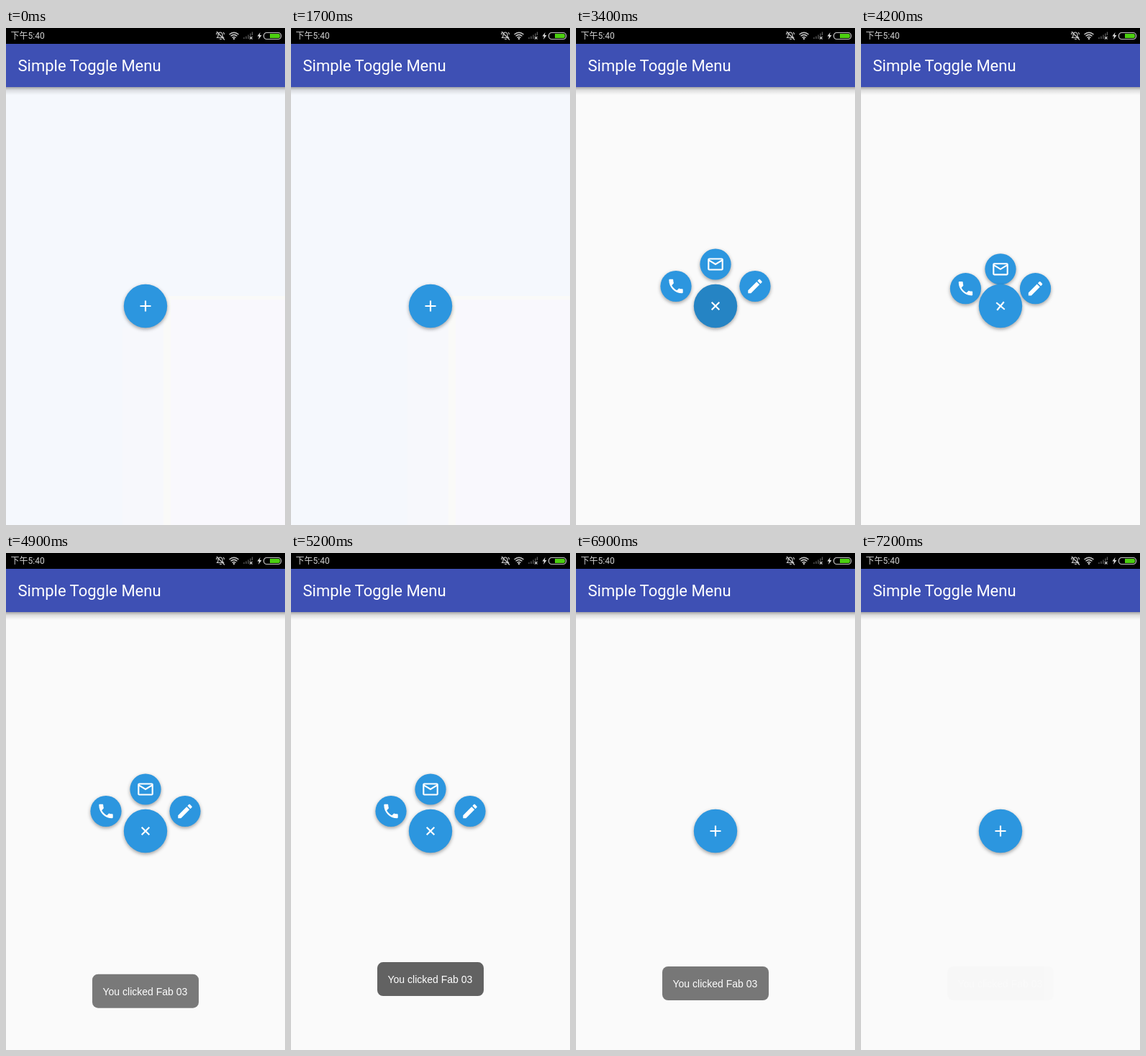
Animation, 388 px wide and 690 px high, one loop 7300 ms. Source, as an HTML page:

```html
<!DOCTYPE html>
<html lang="en">
<head>
<meta charset="utf-8">
<title>Toggle menu</title>
<style>
  html, body { margin: 0; width: 100%; height: 100%; overflow: hidden; background: #fafafa; }
  svg { display: block; }
  .fab { filter: drop-shadow(0 2px 2.5px rgba(0, 0, 0, .36)); }
  .fab circle { fill: #2c96df; }
  .clock { font: 12px Roboto, "Noto Sans CJK SC", "Noto Sans CJK", sans-serif; fill: #d0d0d0; }
  .title { font: 22px Roboto, sans-serif; fill: #fff; }
  .message { font: 14px "Liberation Sans", Arial, sans-serif; fill: #fff; }
</style>
</head>
<body>
<svg width="388" height="690" viewBox="0 0 388 690">
  <defs>
    <linearGradient id="barShadow" x2="0" y2="1">
      <stop stop-color="#000" stop-opacity=".34"/>
      <stop offset=".4" stop-color="#000" stop-opacity=".11"/>
      <stop offset="1" stop-color="#000" stop-opacity="0"/>
    </linearGradient>
  </defs>

  <rect width="388" height="690" fill="#fafafa"/>
  <g id="tint">
    <rect width="388" height="690" fill="#f5f8fd"/>
    <path d="M162 416H219V690H162z" fill="#f7f8fc"/>
    <path d="M219 372H388V690H219z" fill="#fafaf8"/>
    <path d="M229 377H388V690H229z" fill="#f9f8fd"/>
  </g>

  <rect y="82" width="388" height="11" fill="url(#barShadow)"/>
  <rect y="21" width="388" height="61" fill="#3e50b4"/>
  <text class="title" x="16.5" y="60">Simple Toggle Menu</text>

  <rect width="388" height="22"/>
  <text class="clock" x="6.5" y="15">下午5:40</text>
  <g fill="none" stroke="#c8c8c8" stroke-width="1.2">
    <path d="M293.5 13.5H302.5L301 11.5V9Q300.5 6 298 6T295 9V11.5zM297 15.5H300M293 5L304 16.5M292.5 9Q292.5 7 294 6M303.500 9Q303.500 7 302 6"/>
    <path d="M310.500 9Q317 3.500 323.500 9M312.500 11.300Q317 7.500 321.500 11.300M314.500 13.500Q317 11.500 319.500 13.500" stroke-width="1.5"/>
    <path d="M331 15V13M334 15V11.500M337 15V9.500M340 11V7.500M342.500 10V5.500" stroke="#666"/>
    <path d="M339 12L342.500 15.500M342.500 12L339 15.500"/>
    <rect x="358.500" y="6.500" width="24" height="9" rx="4"/>
  </g>
  <circle cx="317" cy="15" r="1.200" fill="#c8c8c8"/>
  <path d="M353.500 6L349.500 11.500H352L351 16L355.500 10H352.800z" fill="#ddd"/>
  <path d="M367 8H379Q381 8 381 11T379 14H367z" fill="#4cd010"/>

  <g class="fab mini" data-x="-55" data-y="-27.5">
    <circle r="21.6"/>
    <path transform="scale(1.078) translate(-12 -12)" fill="#fff" d="M6.62 10.79c1.44 2.83 3.76 5.14 6.59 6.59l2.2-2.2c.27-.27.67-.36 1.02-.24 1.12.37 2.33.57 3.57.57.55 0 1 .45 1 1V20c0 .55-.45 1-1 1-9.39 0-17-7.61-17-17 0-.55.45-1 1-1h3.5c.55 0 1 .45 1 1 0 1.25.2 2.45.57 3.57.11.35.03.74-.25 1.02z"/>
  </g>
  <g class="fab mini" data-x="0" data-y="-58">
    <circle r="21.6"/>
    <path transform="scale(1.078)" fill="none" stroke="#fff" stroke-width="2" d="M-8-7H8Q9-7 9-6V6Q9 7 8 7H-8Q-9 7-9 6V-6Q-9-7-8-7zM-9-5.500L0 0 9-5.500"/>
  </g>
  <g class="fab mini" data-x="55" data-y="-27.5">
    <circle id="thirdDisc" r="21.6"/>
    <path transform="scale(1.078) translate(-12 -12)" fill="#fff" d="M3 17.250V21h3.750L17.810 9.940l-3.750-3.750zM20.710 7.040c.39-.39.39-1.02 0-1.410l-2.340-2.340c-.39-.39-1.02-.39-1.410 0l-1.830 1.830 3.750 3.750z"/>
  </g>
  <g class="fab" transform="translate(194 386)">
    <circle id="mainDisc" r="30.2"/>
    <path id="plus" d="M-7.500 0H7.500M0-7.500V7.500" stroke="#fff" stroke-width="2.150"/>
  </g>

  <g id="toast">
    <rect x="120" y="574" width="148" height="47" rx="8" fill="#626262"/>
    <text class="message" x="134.5" y="603">You clicked Fab 03</text>
  </g>
</svg>

<script>
  const LOOP = 7300, TOGGLE_TIME = 400;
  const toggles = [1930, 2420, 2920, 3410, 3890, 5836];   // open, close, open, ...
  const $ = id => document.getElementById(id);
  const minis = document.querySelectorAll('.mini');

  const progress = (t, start, length) => Math.min(1, Math.max(0, (t - start) / length));
  const ease = p => (1 - Math.cos(Math.PI * p)) / 2;
  const overshoot = p => 1 + (p - 1) ** 2 * (3 * (p - 1) + 2);
  const discColor = pressed => pressed ? '#2584c4' : '#2c96df';

  function draw(t) {
    const open = toggles.reduce((sum, start, i) =>
      sum + (i % 2 ? -1 : 1) * ease(progress(t, start, TOGGLE_TIME)), 0);
    for (const mini of minis) {
      const { x, y } = mini.dataset;
      mini.setAttribute('transform', `translate(${194 + x * open} ${386 + y * open})`);
      mini.style.visibility = open > .001 ? 'visible' : 'hidden';
    }
    $('plus').setAttribute('transform', `rotate(${45 * open})`);
    $('mainDisc').style.fill = discColor(toggles.some(s => t > s - 80 && t < s + 60));
    $('thirdDisc').style.fill = discColor(t >= 4500 && t < 4720);
    $('tint').style.opacity = 1 - progress(t, 1850, 300);

    const rise = progress(t, 4740, 760);
    const fade = 1 - progress(t, 6850, 355);
    $('toast').setAttribute('transform', `translate(0 ${47 * (1 - overshoot(rise))})`);
    $('toast').style.opacity = Math.min(1, rise * 4) * fade;
  }

  const begin = performance.now();
  function tick() {
    draw((performance.now() - begin) % LOOP);
    requestAnimationFrame(tick);
  }
  tick();
</script>
</body>
</html>
```
